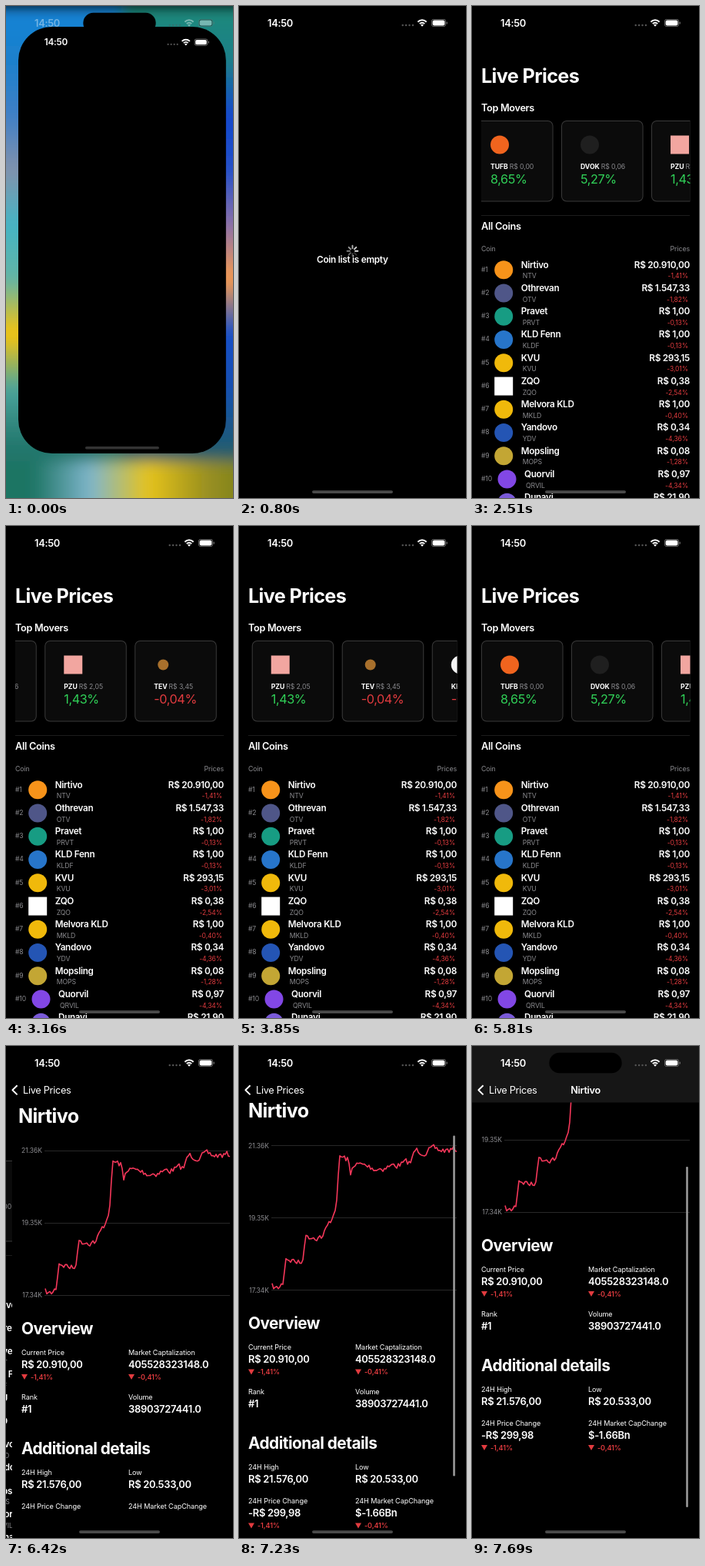
An HTML page that plays this animation: 295x640 px, repeating every 8 s.

```html
<!DOCTYPE html>
<html lang="en">
<head>
<meta charset="utf-8">
<title>Live Prices</title>
<style>
  html, body { margin: 0; width: 100%; height: 100%; overflow: hidden; background: #000; }
  svg { display: block; width: 295px; height: 640px; }
  text { font-family: Inter, Roboto, sans-serif; white-space: pre; }
</style>
</head>
<body>
<svg id="stage" viewBox="0 0 295 640"></svg>
<script>
const LOOP = 8000, TICK = 106.6;
const GRAY = '#8a8a8e', RED = '#e23b3f', GREEN = '#30d158';

function el(parent, tag, attrs = {}, content) {
  const node = document.createElementNS('http://www.w3.org/2000/svg', tag);
  for (const key in attrs) node.setAttribute(key, attrs[key]);
  if (content !== undefined) node.textContent = content;
  parent.appendChild(node);
  return node;
}
const group = (parent, attrs) => el(parent, 'g', attrs);
const rect = (parent, x, y, width, height, fill, rx = 0) =>
  el(parent, 'rect', { x, y, width, height, fill, rx });
const circle = (parent, cx, cy, r, fill) => el(parent, 'circle', { cx, cy, r, fill });
const badge = (parent, cx, cy, fill, square, r = 12) =>
  square ? rect(parent, cx - r, cy - r, 2 * r, 2 * r, fill) : circle(parent, cx, cy, r, fill);
const stroke = (parent, d, width) => el(parent, 'path', {
  d, fill: 'none', stroke: '#fff', 'stroke-width': width, 'stroke-linejoin': 'round'
});

// y is the middle of the capitals
function label(parent, x, y, size, str, weight = 400, fill = '#fff', anchor = 'start') {
  return el(parent, 'text', {
    x, y: y + size * 0.36, fill, 'font-size': size, 'font-weight': weight, 'text-anchor': anchor,
    'letter-spacing': size < 10 ? '-0.01em' : '-0.025em'
  }, str);
}

const svg = document.getElementById('stage');
const defs = el(svg, 'defs');
el(el(defs, 'filter', { id: 'soft' }), 'feGaussianBlur', { stdDeviation: 9 });
const screenClip = rect(el(defs, 'clipPath', { id: 'screen' }), 0, 0, 295, 640, '#fff');
rect(el(defs, 'clipPath', { id: 'strip' }), 12, 145, 271.5, 115, '#fff');

// Home screen wallpaper
function gradient(id, colors, x2, y2) {
  const g = el(defs, 'linearGradient', { id, x2, y2 });
  colors.split(' ').forEach((color, i, all) =>
    el(g, 'stop', { offset: i / (all.length - 1), 'stop-color': color }));
  return `url(#${id})`;
}
const home = group(svg);
const paper = group(home, { filter: 'url(#soft)' });
rect(paper, -40, 0, 190, 640,
  gradient('left', '#1583d6 #1b80cc #3f7fc6 #8292ac #45b4c4 #62b4a4 #f5c40a #4aa49c #24786e #1c6c60', 0, 1));
rect(paper, 150, 0, 190, 640,
  gradient('right', '#1f8a7a #1d7f88 #1148cc #2450c8 #8a70a8 #f59a4e #1450c8 #1450b0 #1e5a78 #55701e', 0, 1));
rect(paper, -40, 592, 375, 90,
  gradient('bottom', '#1c7464 #1c7464 #7fb6cc #e6c31a #9a9020 #6f7a1e', 1, 0));

function statusBar(parent) {
  const g = group(parent);
  label(g, 37, 22, 12.9, '14:50', 600);
  for (let i = 0; i < 4; i++) circle(g, 212.7 + i * 4.4, 25, 1.2, '#555');
  for (const r of [4.4, 7.8]) {
    const d = r * 0.72;
    stroke(g, `M${238 - d} ${26.3 - d}A${r} ${r} 0 0 1 ${238 + d} ${26.3 - d}`, 2);
  }
  el(g, 'path', { d: 'M238 26.8l-2-2.2a3 3 0 0 1 4 0z', fill: '#fff' });
  rect(g, 250, 17, 19, 10, '#777', 3.4);
  rect(g, 250.8, 17.8, 17.4, 8.4, '#000', 2.6);
  rect(g, 251.6, 18.6, 15.8, 6.8, '#fff', 2);
  rect(g, 269.6, 20.5, 1.2, 3, '#777', 0.6);
  return g;
}
const homeStatus = statusBar(svg);

// App window
const app = group(group(svg), { 'clip-path': 'url(#screen)' });
rect(app, 0, 0, 295, 640, '#000');

const empty = group(app);
const spokes = Array.from({ length: 8 }, (_, i) => el(empty, 'line', {
  x1: 147.5, x2: 147.5, y1: 315.2, y2: 311.8, stroke: '#fff', 'stroke-width': 1.9,
  'stroke-linecap': 'round', transform: `rotate(${i * 45} 147.5 318.7)`
}));
label(empty, 147.3, 329.5, 11.8, 'Coin list is empty', 600, '#fff', 'middle');

// Price list
const list = group(app);
const listTitle = label(list, 12, 91, 25.2, 'Live Prices', 700);
label(list, 12, 132, 12.7, 'Top Movers', 600);
rect(list, 12, 272, 271, 0.8, '#242424');
label(list, 12, 286.3, 12.8, 'All Coins', 600);
label(list, 12, 316.3, 8.8, 'Coin', 400, GRAY);
label(list, 283, 316.3, 8.8, 'Prices', 400, GRAY, 'end');

const strip = group(group(list, { 'clip-path': 'url(#strip)' }));
const cardIcons = [];
[
  ['TUFB', '0,00', '8,65%', '#f0641e'],
  ['DVOK', '0,06', '5,27%', '#1f1f1f'],
  ['PZU', '2,05', '1,43%', '#f2a6a0', true],
  ['TEV', '3,45', '-0,04%', '#a8702c', false, 7],
  ['KRU', '27,10', '-0,12%', '#f4f4f4']
].forEach(([sym, price, change, color, square, r], i) => {
  const x = i * 117, left = x + 25;
  rect(strip, x, 149, 106.5, 105.5, '#3a3a3a', 7);
  rect(strip, x + 1, 150, 104.5, 103.5, '#0b0b0b', 6);
  cardIcons.push(badge(strip, left + 12, 180.5, color, square, r));
  const line = label(strip, left, 209.3, 8.7, sym, 700);
  el(line, 'tspan', { dx: 2, fill: GRAY, 'font-weight': 400 }, 'R$ ' + price);
  label(strip, left, 225, 16.2, change, 400, change[0] === '-' ? RED : GREEN);
});

const rowIcons = group(list);
[
  ['Nirtivo', 'NTV', '20.910,00', '1,41', '#f7931a'],
  ['Othrevan', 'OTV', '1.547,33', '1,82', '#4f5688'],
  ['Pravet', 'PRVT', '1,00', '0,13', '#179c83'],
  ['KLD Fenn', 'KLDF', '1,00', '0,13', '#2775ca'],
  ['KVU', 'KVU', '293,15', '3,01', '#f0b90b'],
  ['ZQO', 'ZQO', '0,38', '2,54', '#ffffff', true],
  ['Melvora KLD', 'MKLD', '1,00', '0,40', '#f0b90b'],
  ['Yandovo', 'YDV', '0,34', '4,36', '#2455b4'],
  ['Mopsling', 'MOPS', '0,08', '1,28', '#c3a634'],
  ['Quorvil', 'QRVIL', '0,97', '4,34', '#8247e5'],
  ['Dunavi', 'DNV', '21,90', '3,12', '#7a5ad8']
].forEach(([name, sym, price, change, color, square], i) => {
  const y = 336.3 + i * 30.25, dx = i > 8 ? 5.5 : 1.2;
  label(list, 12, y + 6.3, 8.6, '#' + (i + 1), 400, GRAY);
  badge(rowIcons, 40 + dx, y + 7, color, square);
  label(list, 62.5 + dx, y, 11.7, name, 600);
  label(list, 64.5 + dx, y + 15, 8.7, sym, 400, GRAY);
  label(list, 283, y, 11.8, 'R$ ' + price, 600, '#fff', 'end');
  label(list, 281, y + 15, 8.5, `-${change}%`, 400, RED, 'end');
});

// Coin detail
const detail = group(app);
rect(detail, 0, 0, 295, 640, '#000');
const page = group(detail);
const coinTitle = label(page, 12, 91, 25.2, 'Nirtivo', 700);

['21.36K', '19.35K', '17.34K'].forEach((str, i) => {
  const y = 136 + i * 94;
  label(page, 39, y + 0.3, 8.6, str, 400, GRAY, 'end');
  rect(page, 42, y, 241, 0.7, '#3a3a3a');
});

// Price curve: trend through key points plus a seeded wobble
const trend = [
  [43, 320], [50, 323], [58, 314], [60, 281], [82, 290], [86, 254], [109, 254], [121, 230],
  [128, 205], [130, 150], [142, 155], [145, 177], [148, 160], [180, 166], [224, 158], [228, 143], [284, 142]
];
function trendAt(x) {
  const i = trend.findIndex(p => p[0] > x);
  const [[x0, y0], [x1, y1]] = trend.slice(i - 1, i + 1);
  return y0 + (y1 - y0) * (x - x0) / (x1 - x0);
}
let seed = 7, wobble = 0;
const random = () => (seed = seed * 16807 % 2147483647) / 2147483647;
const points = [];
for (let x = 43; x < 284; x += 2) {
  wobble = wobble * 0.5 + (random() - 0.5) * 9;
  points.push(`${x},${Math.min(324, trendAt(x) + wobble)}`);
}
el(page, 'polyline', {
  points: points.join(' '), fill: 'none', stroke: '#f5375a', 'stroke-width': 1.6, 'stroke-linejoin': 'round'
});

label(page, 12, 367.3, 20.8, 'Overview', 700);
label(page, 12, 523.3, 20.8, 'Additional details', 700);
function stat(x, y, caption, value, change) {
  label(page, x, y, 9.1, caption);
  label(page, x, y + 16.2, 13, value, 600);
  if (!change) return;
  el(page, 'path', { d: `M${x} ${y + 28.8}h8l-4 7z`, fill: RED });
  label(page, x + 12, y + 32.2, 9, change, 600, RED);
}
stat(12, 398.3, 'Current Price', 'R$ 20.910,00', '-1,41%');
stat(151, 398.3, 'Market Captalization', '405528323148.0', '-0,41%');
stat(12, 456.3, 'Rank', '#1');
stat(151, 456.3, 'Volume', '38903727441.0');
stat(12, 554.3, '24H High', 'R$ 21.576,00');
stat(151, 554.3, 'Low', 'R$ 20.533,00');
stat(12, 598.3, '24H Price Change', '-R$ 299,98', '-1,41%');
stat(151, 598.3, '24H Market CapChange', '$-1.66Bn', '-0,41%');

const footer = rect(detail, 0, 606, 295, 34, '#000');
const thumb = rect(detail, 278.2, 0, 2.6, 443, '#9a9a9a', 1.3);
const bar = group(detail);
rect(bar, 0, 0, 295, 73.5, '#161616');
label(bar, 147.5, 57.3, 12.7, 'Nirtivo', 600, '#fff', 'middle');

const back = group(app);
stroke(back, 'M14.6 51.2L8.4 57.3L14.6 63.4', 1.9);
label(back, 22, 57.3, 12.8, 'Live Prices');

statusBar(app);
const grip = rect(app, 95, 630.2, 105, 3.8, '#4a4a4a', 1.9);
rect(svg, 100.3, 8.8, 94.4, 26.4, '#000', 13.2);

// Motion is eased, but sampled in ticks from the start of each gesture
const held = (t, start) => start + Math.floor((t - start) / TICK) * TICK;
const decay = (t, start, tau) => Math.exp((start - held(t, start)) / tau);
function glide(t, shown, start, end, from, to) {
  const p = Math.min(1, (held(t, shown) - start) / (end - start));
  return from + (to - from) * (1 - Math.cos(Math.PI * p)) / 2;
}

function stripX(t) {
  if (t < 2510) return 12;
  if (t < 3730) return glide(t, 2510, 2340, 3490, 12, -233);
  if (t < 4630) return glide(t, 3730, 3685, 4630, -233, 20);
  return 12 + 8 * decay(t, 4630, 160);
}
const opening = t => t < 650 ? decay(t, 0, 180) : 0;
const pushX = t => t < 6100 ? 295 : t < 6650 ? 240 * decay(t, 6100, 94) : 0;
const scrollY = t => t < 7230 ? 0 : glide(t, 7230, 7150, 7650, 0, 108);

const move = (node, x, y = 0) => node.setAttribute('transform', `translate(${x} ${y})`);
const show = (node, on) => node.setAttribute('display', on ? 'inline' : 'none');
const fade = (node, v) => node.setAttribute('opacity', v);

function render(t) {
  const open = opening(t), height = 640 - 33.4 * open;
  app.setAttribute('transform', `translate(${16 * open} ${27 * open}) scale(${1 - 0.085 * open})`);
  screenClip.setAttribute('height', height);
  screenClip.setAttribute('rx', open ? 48 : 0);
  move(grip, 0, height - 640);
  grip.setAttribute('fill', t < 540 ? '#333' : '#4a4a4a');
  show(home, open > 0);
  fade(homeStatus, 0.4 * open);

  show(empty, t >= 540 && t < 950);
  const lead = Math.floor(t / 400);
  spokes.forEach((s, i) => fade(s, 0.9 - 0.1 * ((lead - i + 8) % 8)));

  const push = pushX(t);
  show(list, t >= 950 && push > 0);
  show(rowIcons, t >= 1080);
  cardIcons.forEach(icon => show(icon, t >= 1190));
  move(strip, stripX(t));
  move(list, -0.3 * (295 - push));
  fade(listTitle, Math.max(0, (push - 50) / 245));

  const scroll = scrollY(t);
  show(detail, push < 295);
  move(detail, push);
  move(coinTitle, -push / 2);
  move(page, 0, -scroll);
  show(footer, push > 0);
  show(bar, scroll > 40);
  show(thumb, scroll > 0);
  thumb.setAttribute('y', 157 - (108 - scroll) * 0.4);
  show(back, push < 295);
  fade(back, Math.min(1, 1.1 - push / 295));
}

const start = performance.now();
function tick() {
  render((performance.now() - start) % LOOP);
  requestAnimationFrame(tick);
}
render(0);
requestAnimationFrame(tick);
</script>
</body>
</html>
```
